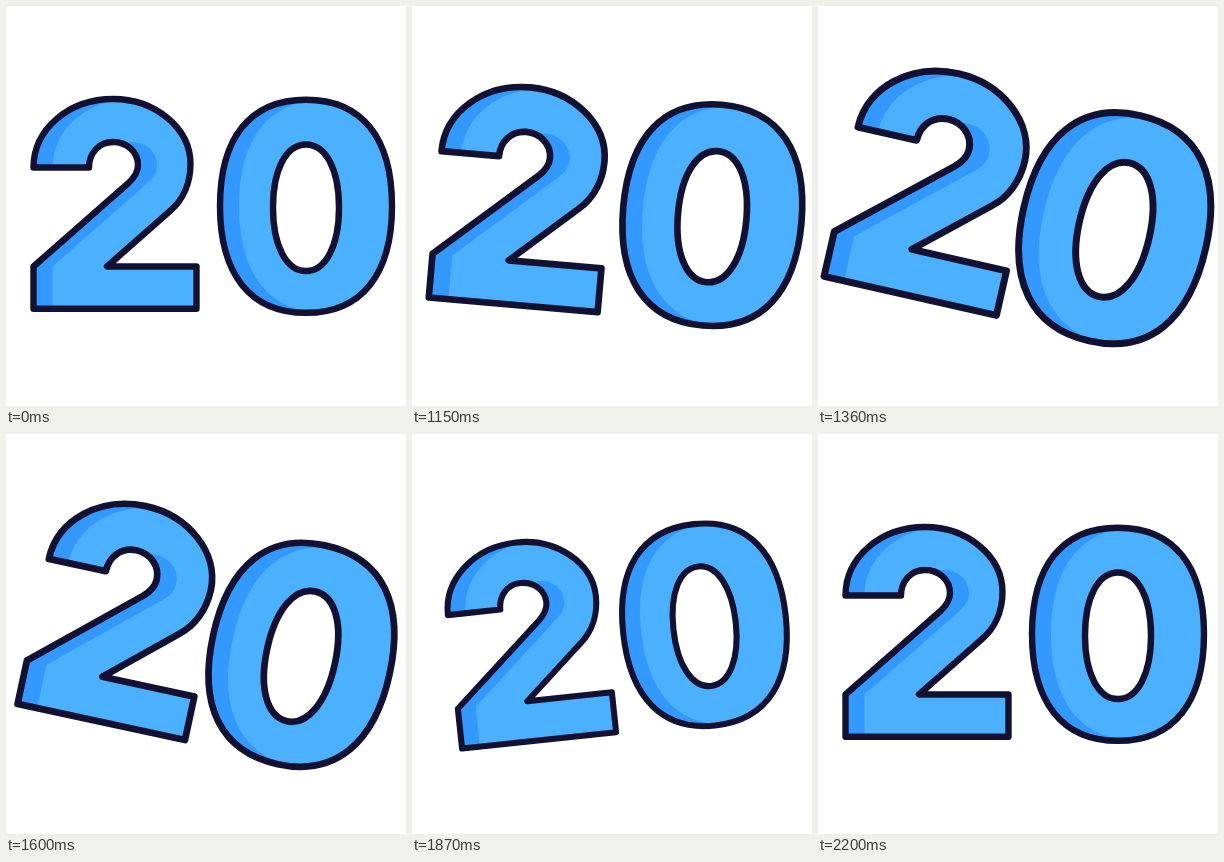
These frames come from a looping animation (400 by 400 pixels, 2230 ms). An HTML page:

```html
<!DOCTYPE html>
<html lang="en">
<head>
<meta charset="utf-8">
<title>20</title>
<style>
  html, body { margin: 0; width: 100%; height: 100%; overflow: hidden; background: #fff; }
  svg { display: block; width: 100%; height: 100%; }
  .shade { fill: #3399ff; }
  .light { fill: #4bb1fe; }
  .line { fill: none; stroke: #121131; stroke-width: 6.4; stroke-linejoin: round; }
</style>
</head>
<body>
<svg viewBox="0 0 400 400">
  <defs>
    <path id="two" d="M27.5 161.5C27.5 123 63 93 107 93C149 93 184.500 122 184.500 158C184.500 177 177 194 164 205L101 260.500H190.500V302.700H27.500V260.500L122.500 177C129 171 132 166 132 159C132 146 121 136 107 136C93 136 83 147 83 161.500Z"/>
    <path id="oval" d="M300 93.700C356 93.700 386 132 386 200S356 306.800 300 306.800S214 268 214 200S244 93.700 300 93.700Z"/>
    <path id="hole" d="M300 138.500C319.500 138.500 333 163 333 201.500S319.500 265 300 265S267 240 267 201.500S280.500 138.500 300 138.500Z"/>
    <clipPath id="inTwo"><use href="#two"/></clipPath>
    <clipPath id="inOval"><use href="#oval"/></clipPath>
  </defs>
  <g id="digit2">
    <use href="#two" class="shade"/>
    <g clip-path="url(#inTwo)"><use href="#two" x="19" class="light"/></g>
    <use href="#two" class="line"/>
  </g>
  <g id="digit0">
    <use href="#oval" class="shade"/>
    <g clip-path="url(#inOval)"><use href="#oval" x="19" class="light"/></g>
    <use href="#hole" fill="#fff"/>
    <use href="#oval" class="line"/>
    <use href="#hole" class="line"/>
  </g>
</svg>
<script>
const LOOP = 2230, REST = 1000, STEP = 30;

const ease = u => (1 - Math.cos(Math.PI * Math.min(1, Math.max(0, u)))) / 2;

// moves from value to value, each during its own [start, end, value]
const glide = (t, value, ...moves) =>
  moves.reduce((v, [start, end, to]) => v + (to - v) * ease((t - start) / (end - start)), value);

const middle = { x: 204.5, y: 199 };
const digits = [
  { node: document.getElementById("digit2"), x: 109, y: 198 },
  { node: document.getElementById("digit0"), x: 300, y: 200 }
];

function draw(now) {
  const elapsed = Math.max(0, now % LOOP - REST);
  const t = Math.floor(elapsed / STEP) * STEP;
  const angle = glide(t, 0, [0, 350, 12.8], [560, 910, -6.7], [930, 1200, 0]);
  const scale = glide(t, 1, [0, 310, 1.084], [460, 880, 0.95], [880, 1200, 1]);
  const spacing = glide(t, 1, [100, 440, 0.96], [440, 880, 0.925], [880, 1200, 1]);
  const drift = 0.2 * Math.max(0, angle);
  for (const { node, x, y } of digits) {
    const dx = (x - middle.x) * spacing, dy = (y - middle.y) * spacing;
    node.setAttribute("transform",
      `translate(${middle.x + drift} ${middle.y + drift * 0.6}) rotate(${angle}) ` +
      `translate(${dx} ${dy}) scale(${scale}) translate(${-x} ${-y})`);
  }
}

const start = performance.now();
function tick() {
  draw(performance.now() - start);
  requestAnimationFrame(tick);
}
tick();
</script>
</body>
</html>
```
